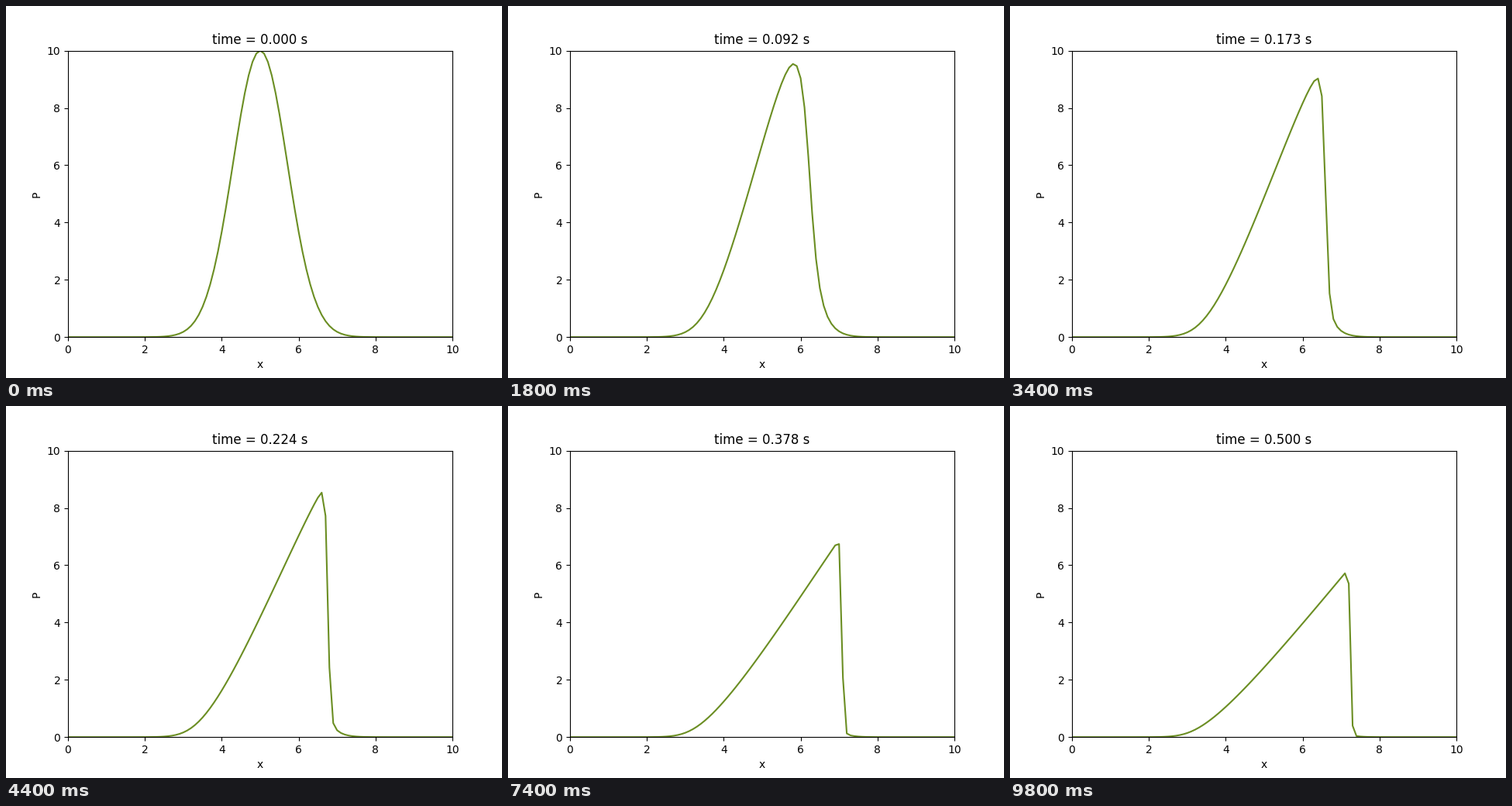
Recreate the animation shown at these times as a matplotlib script. Size 640 px wide and 480 px high, loop 10000 ms.

```python
import matplotlib.pyplot as plt
import numpy as np
from matplotlib.animation import FuncAnimation

FRAMES = 50
STEPS_PER_FRAME = 2
DX, DT = 0.1, 0.005

x = np.linspace(0, 10, 101)
times = np.linspace(0, 0.5, FRAMES)


def solve(steps):
    """Inviscid Burgers equation, first-order upwind scheme."""
    u = 10 * np.exp(-(x - 5) ** 2)
    history = [u]
    for _ in range(steps):
        new = u.copy()
        new[1:] -= DT / DX * u[1:] * (u[1:] - u[:-1])
        u = new
        history.append(u)
    return history


waves = solve(STEPS_PER_FRAME * (FRAMES - 1))[::STEPS_PER_FRAME]

fig, ax = plt.subplots(figsize=(6.4, 4.8), dpi=100)
ax.set(xlim=(0, 10), ylim=(0, 10), xlabel="x", ylabel="P")
line, = ax.plot([], [], color="olivedrab")
title = ax.set_title("")


def update(i):
    line.set_data(x, waves[i])
    title.set_text(f"time = {times[i]:.3f} s")
    return line, title


def init():
    return update(0)


anim = FuncAnimation(fig, update, frames=FRAMES, init_func=init,
                     interval=200, repeat=True, repeat_delay=0)
plt.show()
```
